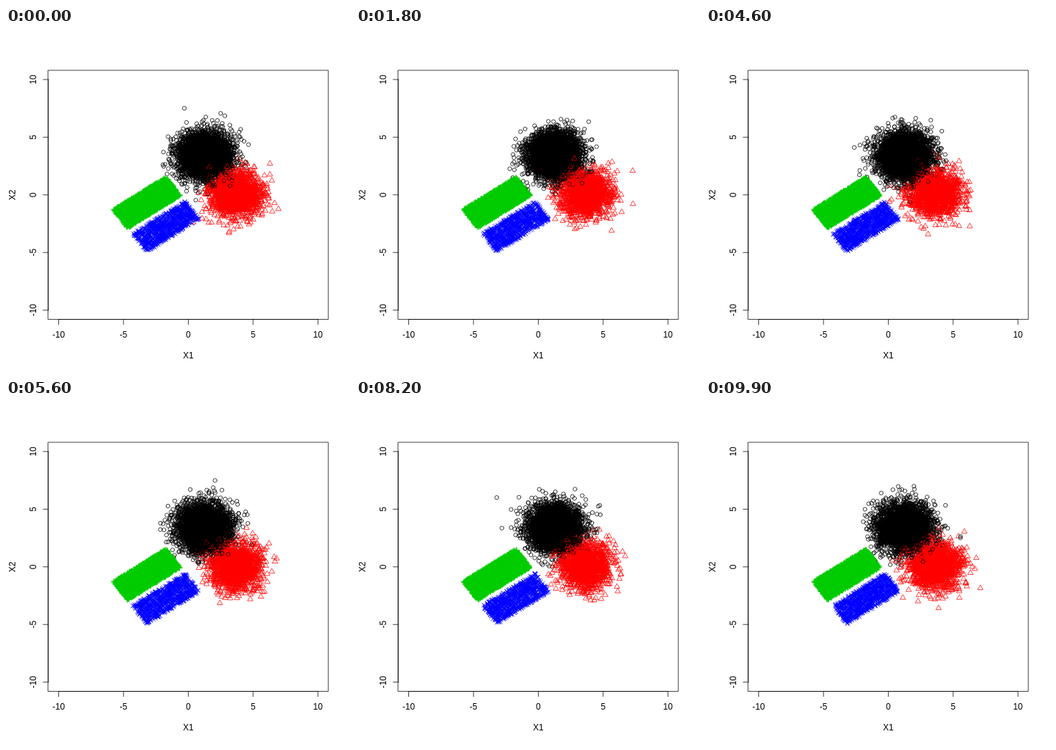
An HTML page with a canvas for the animation above (10 s loop, 480 by 480 pixels).

```html
<!DOCTYPE html>
<html lang="en">
<head>
<meta charset="utf-8">
<title>Cluster scatter plot</title>
<style>
html, body { margin: 0; width: 100%; height: 100%; overflow: hidden; background: #fff; }
canvas { display: block; }
</style>
</head>
<body>
<canvas id="plot" width="480" height="480"></canvas>
<script>
const ctx = document.getElementById('plot').getContext('2d');
const STEP = 100, STEPS = 100;
const LEFT = 59.04, TOP = 59.04, RIGHT = 449.76, BOTTOM = 406.56;
const MID_X = (LEFT + RIGHT) / 2, MID_Y = (TOP + BOTTOM) / 2;
const px = x => MID_X + x * (RIGHT - LEFT) / 21.6;
const py = y => MID_Y - y * (BOTTOM - TOP) / 21.6;

// Seeded generator, so each step always shows the same sample
function seeded(seed) {
  let s = seed;
  return () => {
    s = (s + 0x6D2B79F5) | 0;
    let t = Math.imul(s ^ (s >>> 15), 1 | s);
    t = (t + Math.imul(t ^ (t >>> 7), 61 | t)) ^ t;
    return ((t ^ (t >>> 14)) >>> 0) / 4294967296;
  };
}

const gauss = (mx, my) => rnd => {
  const r = Math.sqrt(-2 * Math.log(1 - rnd())), a = 2 * Math.PI * rnd();
  return [mx + r * Math.cos(a), my + r * Math.sin(a)];
};

// Uniform in a tilted rectangle around its centre
const tilted = (mx, my) => rnd => {
  const u = rnd() - 0.5, v = rnd() - 0.5;
  return [mx + 4.07 * u + 1.1 * v, my + 2.82 * u - 1.59 * v];
};

function line(x1, y1, x2, y2) {
  ctx.moveTo(x1, y1);
  ctx.lineTo(x2, y2);
}
function circle(x, y) {
  ctx.arc(x, y, 2.7, 0, 2 * Math.PI);
}
function triangle(x, y) {
  ctx.moveTo(x, y - 4.2);
  ctx.lineTo(x + 3.64, y + 2.1);
  ctx.lineTo(x - 3.64, y + 2.1);
  ctx.closePath();
}
function plus(x, y) {
  line(x - 3.82, y, x + 3.82, y);
  line(x, y - 3.82, x, y + 3.82);
}
function cross(x, y) {
  line(x - 2.7, y - 2.7, x + 2.7, y + 2.7);
  line(x - 2.7, y + 2.7, x + 2.7, y - 2.7);
}

const COUNT = 9500;
const clusters = [
  { color: '#000', share: 0.42, mark: circle, sample: gauss(1.26, 3.4) },
  { color: '#f00', share: 0.16, mark: triangle, sample: gauss(3.63, 0.1) },
  { color: '#00cd00', share: 0.31, mark: plus, sample: tilted(-3.2, -0.67) },
  { color: '#00f', share: 0.11, mark: cross, sample: tilted(-1.72, -2.75) }
];

// Picks a cluster in proportion to its share
function pick(rnd) {
  let rest = rnd();
  return clusters.find(c => (rest -= c.share) < 0) || clusters[0];
}

function label(text, x, y, turn = 0) {
  ctx.save();
  ctx.translate(x, y);
  ctx.rotate(turn);
  ctx.fillText(text, 0, 0);
  ctx.restore();
}

function drawAxes() {
  ctx.strokeStyle = ctx.fillStyle = '#000';
  ctx.font = '12px "Liberation Sans", Arial, sans-serif';
  ctx.textAlign = 'center';
  ctx.strokeRect(LEFT, TOP, RIGHT - LEFT, BOTTOM - TOP);
  ctx.beginPath();
  line(px(-10), BOTTOM, px(10), BOTTOM);
  line(LEFT, py(-10), LEFT, py(10));
  for (let v = -10; v <= 10; v += 5) {
    line(px(v), BOTTOM, px(v), BOTTOM + 7.2);
    line(LEFT, py(v), LEFT - 7.2, py(v));
    label(v, px(v), 432);
    label(v, 42, py(v), -Math.PI / 2);
  }
  ctx.stroke();
  label('X1', MID_X, 461);
  label('X2', 13, MID_Y, -Math.PI / 2);
}

function draw(step) {
  const rnd = seeded(7919 * (step + 1));
  ctx.fillStyle = '#fff';
  ctx.fillRect(0, 0, 480, 480);
  ctx.lineWidth = 0.75;
  ctx.lineJoin = ctx.lineCap = 'round';
  for (let i = 0; i < COUNT; i++) {
    const { color, mark, sample } = pick(rnd);
    const [x, y] = sample(rnd);
    ctx.strokeStyle = color;
    ctx.beginPath();
    mark(px(x), py(y));
    ctx.stroke();
  }
  drawAxes();
}

let shown = -1;
const start = performance.now();
function tick() {
  const step = Math.floor((performance.now() - start) / STEP) % STEPS;
  if (step !== shown) draw(shown = step);
  requestAnimationFrame(tick);
}
tick();
</script>
</body>
</html>
```
